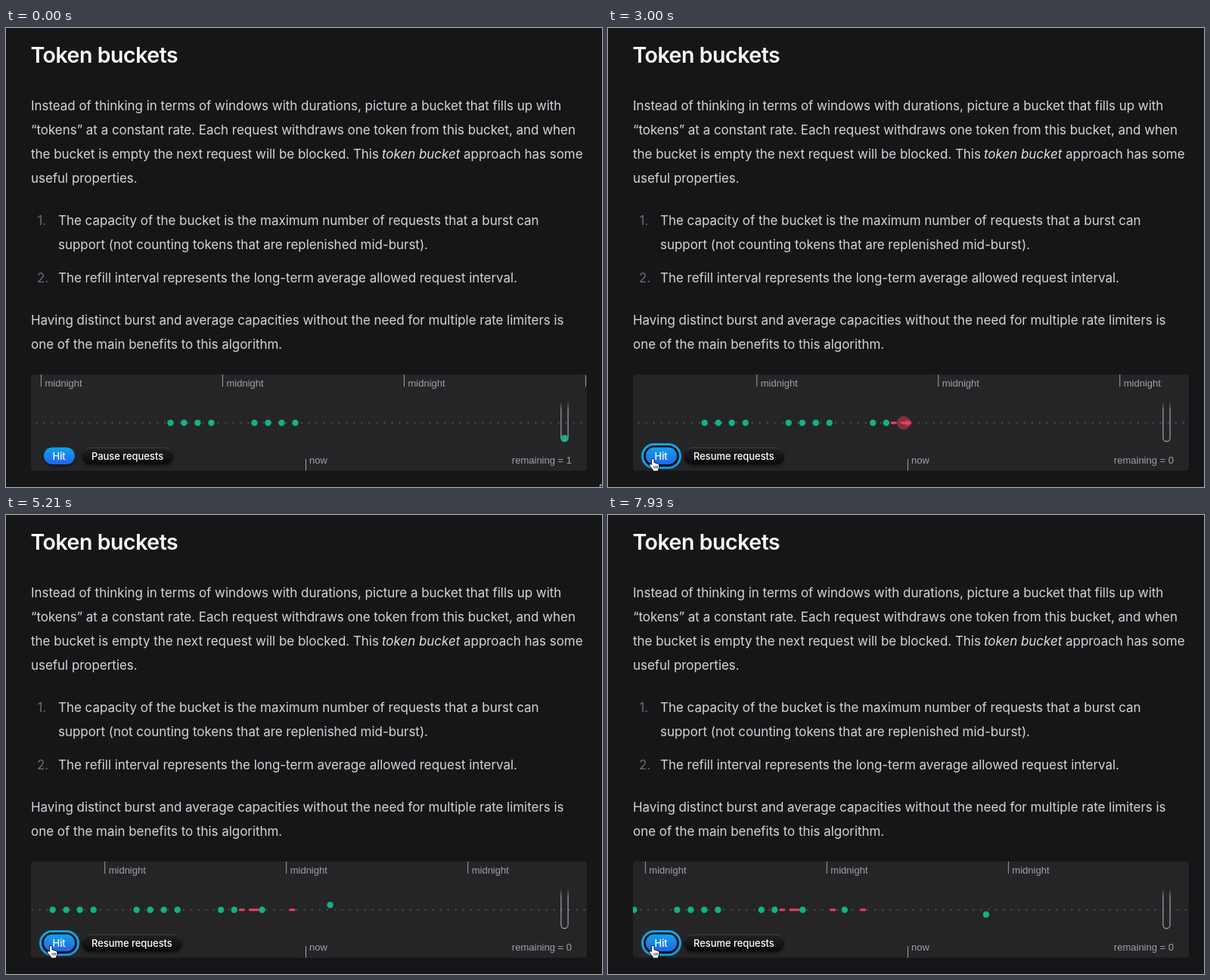
An HTML page with a canvas for the animation above (8 s loop, 788x608 px).

```html
<!DOCTYPE html>
<html lang="en">
<head>
<meta charset="utf-8">
<title>Token buckets</title>
<style>
  html, body { margin: 0; width: 100%; height: 100%; overflow: hidden; background: #161618; }
  svg, canvas { position: absolute; left: 0; top: 0; display: block; }
  text { font: 400 17px Inter, sans-serif; letter-spacing: -0.04px; fill: #d4d4d8; }
  .title { font-size: 28.5px; font-weight: 600; letter-spacing: -0.45px; fill: #fff; }
  .num { fill: #6b6b72; }
  .em { font-style: italic; fill: #dedee2; }
</style>
</head>
<body>
<svg width="788" height="608">
  <text class="title" x="32.4" y="46">Token buckets</text>
  <text x="33" y="109">Instead of thinking in terms of windows with durations, picture a bucket that fills up with</text>
  <text x="33" y="141">“tokens” at a constant rate. Each request withdraws one token from this bucket, and when</text>
  <text x="33" y="173">the bucket is empty the next request will be blocked. This</text>
  <text class="em" x="497" y="173">token bucket</text>
  <text x="605" y="173">approach has some</text>
  <text x="33" y="205">useful properties.</text>
  <text class="num" x="41.5" y="261">1.</text>
  <text x="69" y="261">The capacity of the bucket is the maximum number of requests that a burst can</text>
  <text x="69" y="293">support (not counting tokens that are replenished mid-burst).</text>
  <text class="num" x="41" y="337">2.</text>
  <text x="69" y="337">The refill interval represents the long-term average allowed request interval.</text>
  <text x="33" y="393">Having distinct burst and average capacities without the need for multiple rate limiters is</text>
  <text x="33" y="425">one of the main benefits to this algorithm.</text>
</svg>
<canvas id="stage" width="788" height="608"></canvas>
<script>
const ctx = document.getElementById('stage').getContext('2d');

const LOOP = 8, SPEED = 29.9;
const PANEL = { x: 33, y: 459, w: 735, h: 127.5 };
const LINE_Y = 523, HIT_X = 402.2, NOW_X = 396.5;
const BUCKET_X = 738.5, FLOOR_Y = 543.5, SPAWN_Y = 458;
const FALL = 0.4, FLIGHT = 0.5, PULSE = 0.72;
const GREEN = '#12b37f', RED = '#f43f5e', GREY = '#a1a1a6';
const FIRST_CLICK = 2.184;

// Each token is refilled at `born` and spent by a request at `used` (seconds).
const tokens = [
  { born: -9, used: 1.85, slot: 0 },
  { born: 1.09, used: 1.264, slot: 1 },
  { born: 3.01, used: 3.087, slot: 0 },
  { born: 4.93, used: 4.943, slot: 0 },
  { born: 6.85, used: 7.766, slot: 0 }
];
const blocked = [FIRST_CLICK, 2.62, 2.82, 4.425, 5.763];
const bursts = [217.5, 328.5];

const clamp = v => Math.min(1, Math.max(0, v));
const easeOut = u => 1 - (1 - u) ** 3;
const mix = (a, b, u) => a + (b - a) * u;

function circle(x, y, r, color) {
  ctx.fillStyle = color;
  ctx.beginPath();
  ctx.arc(x, y, r, 0, Math.PI * 2);
  ctx.fill();
}

function pill(x, y, w, h) {
  ctx.beginPath();
  ctx.roundRect(x, y, w, h, h / 2);
}

function vline(x, y, h) {
  ctx.fillStyle = GREY;
  ctx.fillRect(x - 0.5, y, 1, h);
}

function label(str, x, y, align = 'left') {
  ctx.font = '13px "Liberation Sans", Arial, sans-serif';
  ctx.textAlign = align;
  ctx.fillStyle = GREY;
  ctx.fillText(str, x, y);
}

function buttonText(str, x) {
  ctx.font = '500 13px Inter, sans-serif';
  ctx.letterSpacing = '-0.05px';
  ctx.textAlign = 'left';
  ctx.fillStyle = '#fff';
  ctx.fillText(str, x, 571.5);
  ctx.letterSpacing = '0px';
}

function vertical(y0, y1, top, bottom) {
  const g = ctx.createLinearGradient(0, y0, 0, y1);
  g.addColorStop(0, top);
  g.addColorStop(1, bottom);
  return g;
}

function drawScale(shift) {
  for (let x = 40.5 - shift % 10; x < 770; x += 10) circle(x, LINE_Y, 1.2, '#48484d');
  for (let x = 46.5 - shift; x < 780; x += 240) {
    vline(x, 459, 16);
    label('midnight', x + 5, 475);
  }
  vline(NOW_X, 571, 16);
  label('now', 401, 577);
}

function drawBlocked(t, shift) {
  for (const at of blocked) {
    const age = t - at;
    if (age < 0) continue;
    const x = HIT_X + SPEED * at - shift;
    if (age < PULSE) {
      ctx.globalAlpha = 0.45;
      circle(x, LINE_Y, 9 * Math.sin(Math.PI * age / PULSE) ** 2, RED);
      ctx.globalAlpha = 1;
    }
    ctx.fillStyle = RED;
    pill(x - 4, LINE_Y - 1.5, 8, 3);
    ctx.fill();
  }
}

function tokenY(token, t) {
  const u = clamp((t - token.born) / FALL);
  return mix(SPAWN_Y, FLOOR_Y - 9 * token.slot, u * u);
}

function drawBucket() {
  ctx.strokeStyle = vertical(494, 506, 'rgba(161,161,166,0)', GREY);
  ctx.lineWidth = 1.2;
  ctx.beginPath();
  ctx.moveTo(BUCKET_X - 4.6, 496);
  ctx.lineTo(BUCKET_X - 4.6, 543);
  ctx.arc(BUCKET_X, 543, 4.6, Math.PI, 0, true);
  ctx.lineTo(BUCKET_X + 4.6, 496);
  ctx.stroke();
}

function drawTokens(t, shift) {
  let remaining = 0;
  for (const token of tokens) {
    if (t < token.born) continue;
    if (t < token.used) {
      remaining++;
      circle(BUCKET_X, tokenY(token, t), 4.5, GREEN);
      continue;
    }
    const u = easeOut(clamp((t - token.used) / FLIGHT));
    const goal = HIT_X + SPEED * token.used - shift;
    circle(mix(BUCKET_X, goal, u), mix(tokenY(token, token.used), LINE_Y, u), 4.2, GREEN);
  }
  label('remaining = ' + remaining, 748, 577, 'right');
}

function drawButtons(clicked) {
  if (clicked) {
    ctx.fillStyle = '#18181b';
    ctx.strokeStyle = '#13a3e8';
    ctx.lineWidth = 3;
    pill(45.5, 551.5, 50, 31);
    ctx.fill();
    ctx.stroke();
  }
  const wide = clicked ? 132.5 : 120.5;
  ctx.save();
  ctx.shadowColor = 'rgba(0,0,0,0.5)';
  ctx.shadowBlur = 4;
  ctx.shadowOffsetY = 2;
  ctx.fillStyle = vertical(555, 578, '#0ea5e9', '#2563eb');
  pill(50, 555.5, 41, 22.5);
  ctx.fill();
  ctx.fillStyle = vertical(555, 578, '#232326', '#09090b');
  pill(100.5, 555.5, wide, 22.5);
  ctx.fill();
  ctx.restore();
  ctx.strokeStyle = vertical(555, 567, 'rgba(255,255,255,0.16)', 'rgba(255,255,255,0)');
  ctx.lineWidth = 1;
  pill(101, 556, wide - 1, 21.5);
  ctx.stroke();
  buttonText('Hit', 61.5);
  buttonText(clicked ? 'Resume requests' : 'Pause requests', 113);
}

const arrowPath = new Path2D('M0 0V14L3.2 11.2 5.6 16.6 8 15.5 5.7 10.3H10Z');
const handPath = new Path2D(
  'M3.6 9V2.2Q3.6 .8 5 .8T6.4 2.2V6.4Q7.8 5.4 8.8 7Q10.2 6.2 11 7.7' +
  'Q13 7.2 13 9.2V11.5Q13 13.5 11.8 15V16.6H5.4V15Q3.2 13 1 9.8Q.2 8.2 1.6 7.9Q2.6 7.8 3.6 9Z');

function drawCursor(path, x, y, fill, edge) {
  ctx.save();
  ctx.translate(x, y);
  ctx.lineJoin = 'round';
  ctx.lineWidth = 1.6;
  ctx.strokeStyle = edge;
  ctx.stroke(path);
  ctx.fillStyle = fill;
  ctx.fill(path);
  ctx.restore();
}

function drawPointer(t, clicked) {
  if (clicked) {
    drawCursor(handPath, 54.3, 570, '#fff', '#000');
    ctx.strokeStyle = '#000';
    ctx.lineWidth = 0.8;
    ctx.beginPath();
    for (const x of [61, 63.3, 65.3]) {
      ctx.moveTo(x, 580);
      ctx.lineTo(x, 583.5);
    }
    ctx.stroke();
  } else if (t < 0.2) {
    drawCursor(arrowPath, 786, 605, '#000', '#fff');
  } else if (t > 0.93) {
    const u = easeOut(clamp((t - 0.93) / 0.75));
    drawCursor(arrowPath, mix(10, 55, u), mix(608, 568, u), '#000', '#fff');
  }
}

function draw(t) {
  const shift = SPEED * t, clicked = t >= FIRST_CLICK;
  ctx.clearRect(0, 0, 788, 608);
  ctx.save();
  ctx.beginPath();
  ctx.roundRect(PANEL.x, PANEL.y, PANEL.w, PANEL.h, 4);
  ctx.fillStyle = '#252528';
  ctx.fill();
  ctx.clip();
  drawScale(shift);
  drawBlocked(t, shift);
  for (const start of bursts)
    for (let i = 0; i < 4; i++) circle(start + 18 * i - shift, LINE_Y, 4.2, GREEN);
  drawBucket();
  drawTokens(t, shift);
  drawButtons(clicked);
  ctx.restore();
  drawPointer(t, clicked);
}

const begin = performance.now();
function tick() {
  draw((performance.now() - begin) / 1000 % LOOP);
  requestAnimationFrame(tick);
}
tick();
</script>
</body>
</html>
```
